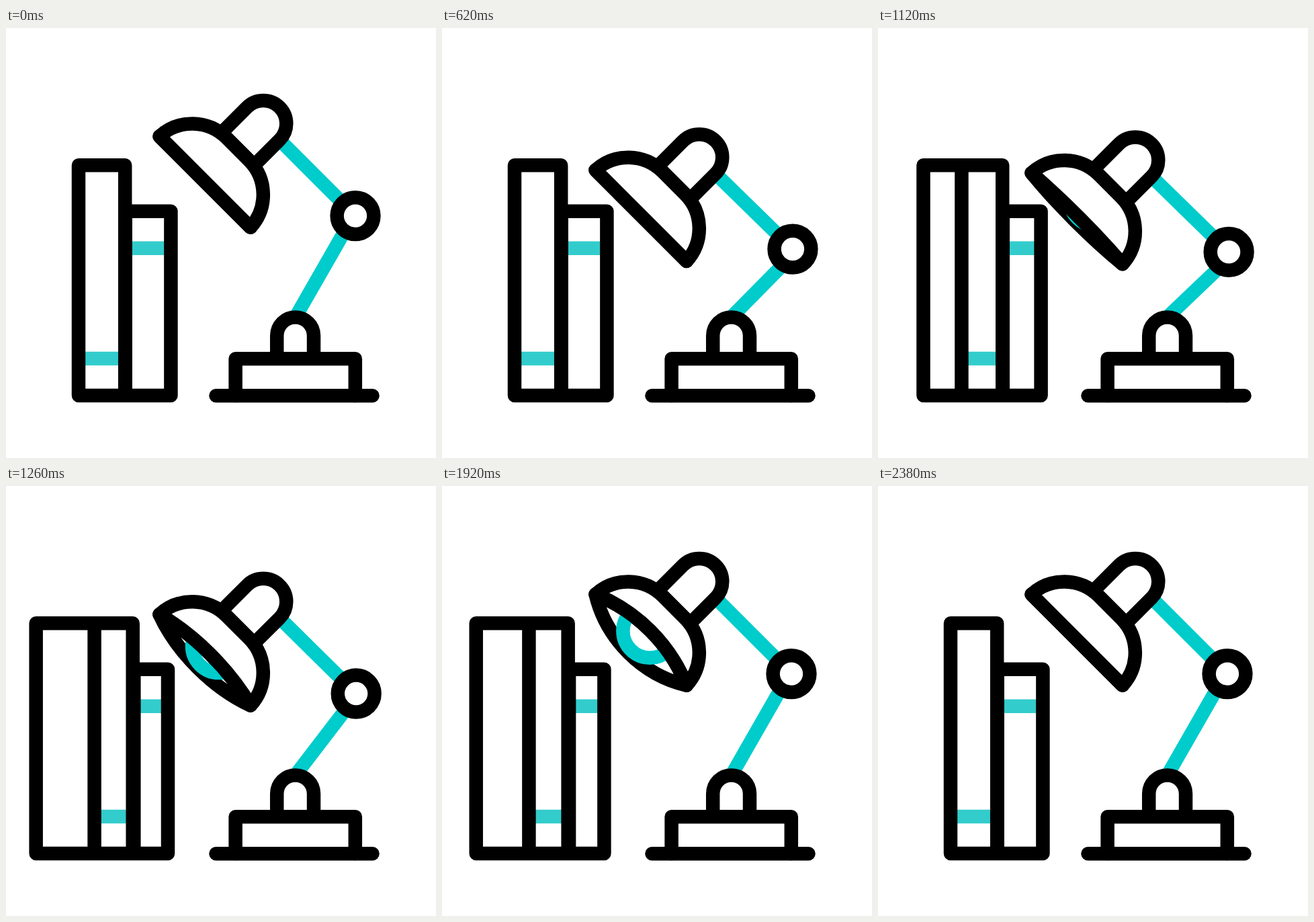
Write an HTML page that moves like this. It is 640x640 px and loops after 2.4 s.

```html
<!DOCTYPE html>
<html lang="en">
<head>
<meta charset="utf-8">
<title>Desk lamp and books</title>
<style>
  html, body { margin: 0; width: 100%; height: 100%; overflow: hidden; background: #fff; }
  svg { display: block; width: 100vw; height: 100vh; }
  .ink { fill: #fff; stroke: #000; stroke-width: 20.5; stroke-linecap: round; stroke-linejoin: round; }
  .open { fill: none; }
  .arm, .band { fill: none; stroke: #0cc; stroke-width: 20.5; }
  .band { stroke: #3cc; }
</style>
</head>
<body>
<svg viewBox="0 0 640 640">
  <path class="band" id="bands"/>
  <path class="ink open" id="books"/>

  <path class="arm" id="lowerArm"/>
  <path class="arm" id="upperArm"/>
  <circle class="ink" id="elbow" r="27.4"/>

  <path class="ink" d="M403.2 492V457.8a27.4 27.4 0 0 1 54.8 0V492"/>
  <path class="ink" d="M341.6 547V492.3H519.8V547"/>
  <path class="ink" d="M312.5 547.2H545.5"/>

  <g id="head">
    <path class="ink" id="rim"/>
    <path class="arm" id="bulb" d="M-40 0A40 40 0 0 0 40 0"/>
    <path class="ink" d="M-34.3 -69V-122.7A34.3 34.3 0 0 1 34.3 -122.7V-69Z"/>
    <path class="ink" id="shade"/>
  </g>
</svg>
<script>
const LOOP = 2400;
const $ = id => document.getElementById(id);
const set = (id, name, value) => $(id).setAttribute(name, value);
const mix = (a, b, k) => a + (b - a) * k;
const ease = k => k * k * (3 - 2 * k);
const part = (t, from, to) => Math.min(1, Math.max(0, (t - from) / (to - from)));

function drawBooks(t) {
  const lin = t < 1600 ? part(t, 800, 1400) : 1 - part(t, 1800, 2200);
  const k = ease(lin);
  const edge = mix(108, 34.7, k);
  const fold = mix(108, 138.7, lin);
  const spine = mix(177.2, 192.2, lin);
  const left = mix(177.7, 192.3, k);
  const right = mix(245.4, 240.3, k);
  const box = (x1, x2, y) => `M${x1} ${y}H${x2}V547H${x1}Z`;
  set('books', 'd', box(edge, fold, 204.3) + box(fold, spine, 204.3) + box(left, right, 272.8));
  set('bands', 'd', `M${fold} 492H${spine}M${left} 327.7H${right}`);
}

function drawLamp(t) {
  const drop = ease(part(t, 200, 800)) - ease(part(t, 1000, 1500));
  const open = ease(part(t, 1000, 1500)) - ease(part(t, 1800, 2400));
  const dx = 2.5 * drop, dy = 63 * drop, y = 64 * drop;

  const ex = 520 + dx, ey = 279.6 + dy;
  set('elbow', 'cx', ex);
  set('elbow', 'cy', ey);
  set('upperArm', 'd', `M400 ${159.5 + y}L${ex} ${ey}`);
  set('lowerArm', 'd', `M431 430L${mix(431, 501.5 + dx, 1.07)} ${mix(430, 307 + dy, 1.07)}`);

  // Head axes: x runs along the mouth of the shade, y points out of it.
  set('head', 'transform', `translate(296.2 ${229 + y}) rotate(45)`);
  const low = 40 * open, high = -29 * open;
  const top = `C35 ${high} -35 ${high} -95.8 0`;
  set('rim', 'd', `M-95.8 0C-38 ${low} 38 ${low} 95.8 0${top}Z`);
  set('shade', 'd', `M-95.8 0A72.4 72.4 0 0 1 -24 -69H24A72.4 72.4 0 0 1 95.8 0${top}Z`);
  set('bulb', 'transform', `translate(0 ${mix(-45.2, -15.5, open)})`);
}

function frame() {
  const t = (performance.now() - start) % LOOP;
  drawBooks(t);
  drawLamp(t);
  requestAnimationFrame(frame);
}

const start = performance.now();
frame();
</script>
</body>
</html>
```
